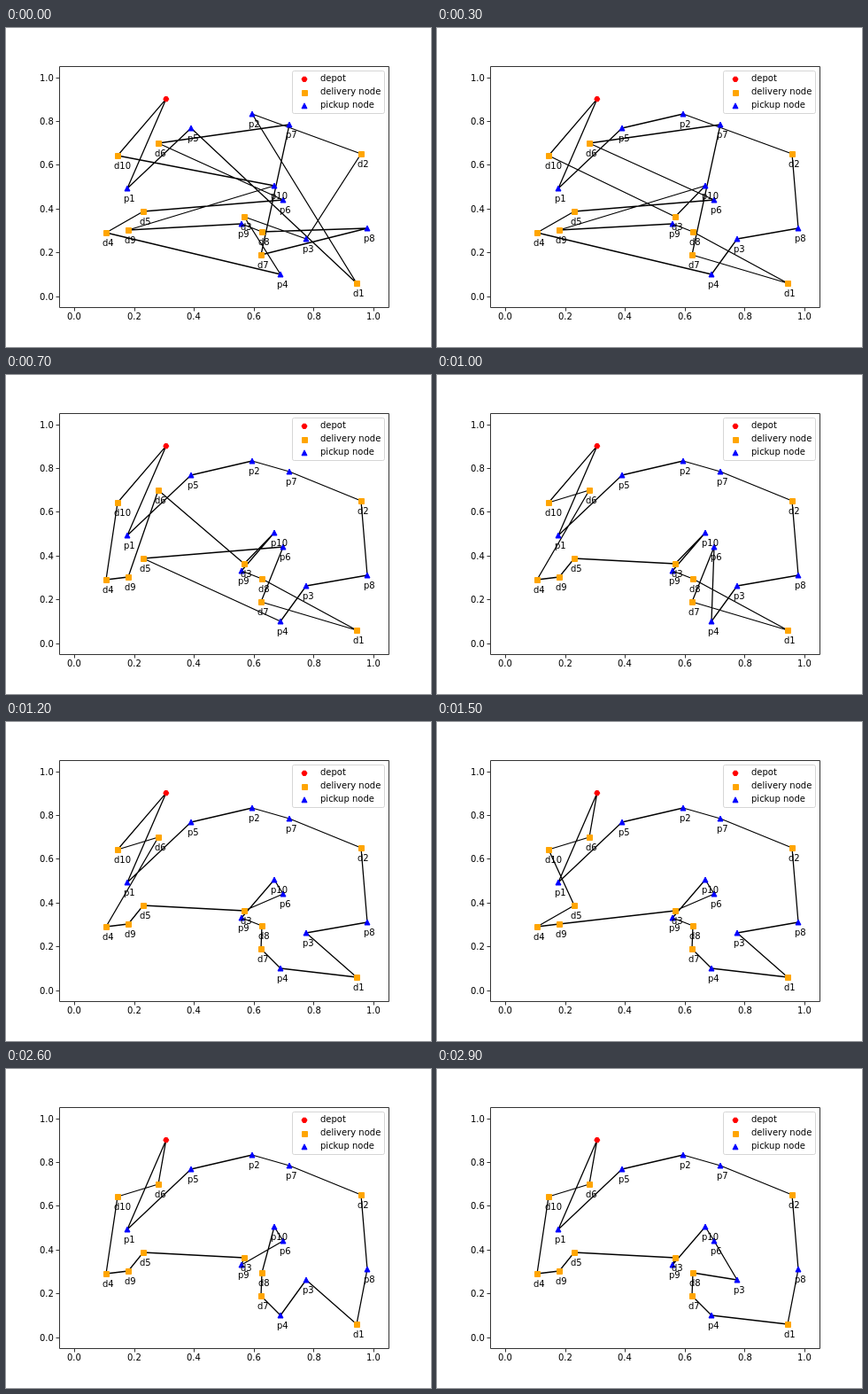
These frames come from a looping animation (480x360 px, 8 s). An HTML page:

```html
<!DOCTYPE html>
<html lang="en">
<head>
<meta charset="utf-8">
<title>Pickup and delivery route</title>
<style>
  html, body { margin: 0; width: 100%; height: 100%; overflow: hidden; background: #fff; }
  svg { display: block; }
  text { font: 10px "DejaVu Sans", sans-serif; }
  .depot { fill: red; stroke: red; }
  .d { fill: orange; stroke: orange; }
  .p { fill: blue; stroke: blue; }
</style>
</head>
<body>
<svg id="plot" width="480" height="360" viewBox="0 0 480 360"></svg>
<script>
const nodes = {
  depot: [180.8, 80.2],
  p1: [137, 181], p2: [278, 97], p3: [339, 238], p4: [310, 278], p5: [209, 113],
  p6: [313, 194], p7: [320, 109], p8: [408, 226], p9: [266, 221], p10: [303, 178],
  d1: [396, 288], d2: [401, 142], d3: [269, 213], d4: [113, 231], d5: [155, 207],
  d6: [172, 130], d7: [288, 256], d8: [289, 230], d9: [138, 228], d10: [126, 144]
};
const start = 'depot p1 p5 d1 p2 d2 p3 d3 p4 d4 d5 p6 d6 p7 d7 p8 d8 p9 d9 p10 d10'.split(' ');

// Local search: at each time, a stop is moved to just behind another one.
const moves = [
  [100, 'd1', 'd7'], [200, 'p8', 'd2'], [300, 'd3', 'p10'],
  [400, 'p7', 'p2'], [500, 'd9', 'd3'], [600, 'd4', 'd9'], [700, 'd6', 'd3'],
  [800, 'd6', 'd4'], [1000, 'd5', 'd3'],
  [1100, 'p6', 'p10'], [1200, 'd1', 'p3'], [1400, 'd10', 'd4'], [1500, 'd5', 'd4'],
  [2000, 'p9', 'p6'], [2100, 'd1', 'p8'],
  [2600, 'd5', 'd3'], [2700, 'p3', 'd8'], [2900, 'p10', 'p6']
];
const LOOP = 8000;

const shapes = {
  depot: 'M3 0L1.5 2.6H-1.5L-3 0L-1.5 -2.6H1.5Z',
  d: 'M-3 -3H3V3H-3Z',
  p: 'M0 -3L3 3H-3Z'
};

// Upright edges sit on pixel centres; text starts on whole pixels.
const snap = v => Math.round(v) + 0.5;
const label = (s, x, y) => `<text x="${Math.round(x)}" y="${Math.round(y)}">${s}</text>`;
function marker(kind, x, y) {
  if (kind === 'd') [x, y] = [snap(x), snap(y)];
  return `<path class="${kind}" d="${shapes[kind]}" transform="translate(${x} ${y})"/>`;
}

let ticks = '', tickText = '';
for (let i = 0; i <= 5; i++) {
  const x = 76.9 + 67.64 * i, y = 302.65 - 49.42 * i, s = (i / 5).toFixed(1);
  ticks += `M${snap(x)} 316v3.5M60 ${snap(y)}h-3.5`;
  tickText += label(s, x - 7.7, 329) + label(s, 37.6, y + 4);
}

let marks = '', names = '';
for (const [id, [x, y]] of Object.entries(nodes)) {
  marks += marker(id === 'depot' ? id : id[0], x, y);
  if (id !== 'depot') names += label(id, x - 4.3, y + 14.9);
}

const legend = [['depot', 'depot'], ['d', 'delivery node'], ['p', 'pickup node']]
  .map(([kind, s], i) => marker(kind, 337, 57.8 + 15 * i) + label(s, 355, 60 + 15 * i)).join('');

document.getElementById('plot').innerHTML = `
  <path id="route" fill="none" stroke="#000" stroke-width="1.3" stroke-linejoin="round"/>
  ${marks}
  <path d="M60.5 43.5H432.5V315.5H60.5Z${ticks}" fill="none" stroke="#333"/>
  ${tickText}${names}
  <rect x="323.5" y="48.5" width="104" height="48" rx="2" fill="#fff" fill-opacity=".8" stroke="#ccc" stroke-opacity=".8"/>
  ${legend}`;

const route = document.getElementById('route');

function tourAt(t) {
  const tour = [...start];
  for (const [time, stop, after] of moves) {
    if (time > t) break;
    tour.splice(tour.indexOf(stop), 1);
    tour.splice(tour.indexOf(after) + 1, 0, stop);
  }
  return tour;
}

const t0 = performance.now();
function draw() {
  const t = (performance.now() - t0) % LOOP;
  route.setAttribute('d', 'M' + tourAt(t).map(id => nodes[id].join(' ')).join('L') + 'Z');
  requestAnimationFrame(draw);
}
draw();
</script>
</body>
</html>
```
